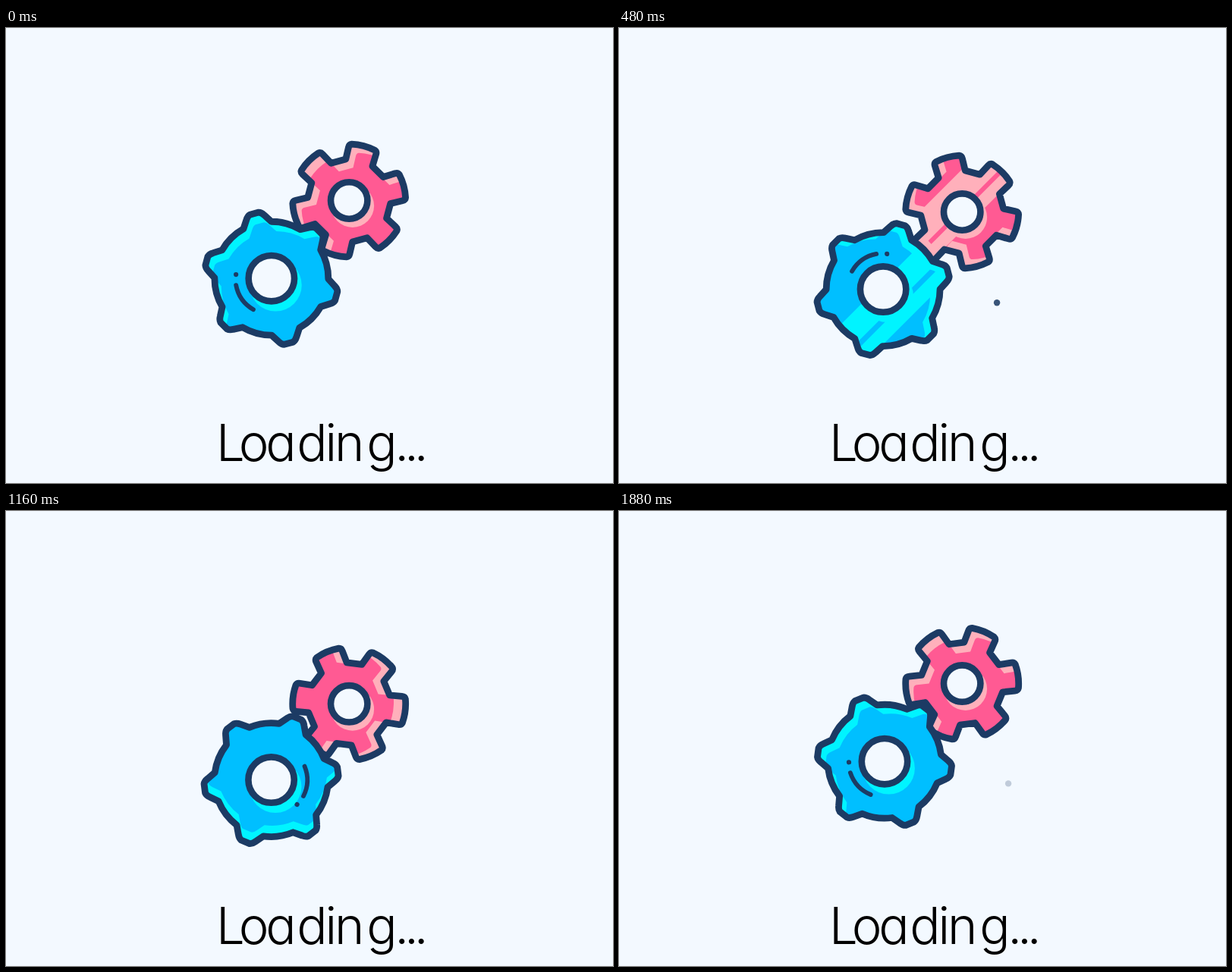
Write an HTML page that moves like this. It is 800 px wide and 600 px high and loops after 1920 ms.

```html
<!DOCTYPE html>
<html lang="en">
<head>
<meta charset="utf-8">
<title>Loading</title>
<style>
  html, body { margin: 0; width: 100%; height: 100%; overflow: hidden; background: #f3f9ff; }
  svg { display: block; width: 100vw; height: 100vh; }
  text {
    font: 300 67px Inter, "Open Sans", sans-serif;
    font-feature-settings: "cv11";
    letter-spacing: -3.2px;
  }
</style>
</head>
<body>
<svg id="stage" viewBox="0 0 800 600">
  <text x="277" y="570.5" dx="0 -5 -1 4 0 0 6 0 -3 -3">Loading...</text>
</svg>
<script>
const LOOP = 1920, NAVY = '#1c3b64', PAPER = '#f3f9ff', RAD = Math.PI / 180;
const stage = document.getElementById('stage');

function add(parent, tag, attrs = {}) {
  const el = document.createElementNS('http://www.w3.org/2000/svg', tag);
  for (const key in attrs) el.setAttribute(key, attrs[key]);
  return parent.appendChild(el);
}

const polar = (r, deg) => [r * Math.cos(deg * RAD), r * Math.sin(deg * RAD)];
const fmt = ([x, y]) => x.toFixed(2) + ' ' + y.toFixed(2);

// Point given along and across an axis that leaves the centre at deg.
function onAxis(deg, along, across) {
  const [c, s] = polar(1, deg);
  return fmt([along * c - across * s, along * s + across * c]);
}

// Round body with six tapered teeth.
function cogPath() {
  let d = '';
  for (let i = 0; i < 6; i++) {
    const a = 15 + 60 * i, p = (r, w) => onAxis(a, r, w);
    d += `${i ? 'A75 75 0 0 1 ' : 'M'}${p(72.5, -19)}L${p(83, -12.2)}Q${p(87.5, -9.5)} ${p(88.5, -6)}`
       + `L${p(88.5, 6)}Q${p(87.5, 9.5)} ${p(83, 12.2)}L${p(72.5, 19)}`;
  }
  return d + 'A75 75 0 0 1 ' + onAxis(15, 72.5, -19) + 'Z';
}

// Wide arc-tipped teeth separated by six notches.
function notchPath() {
  let d = '';
  for (let i = 0; i < 6; i++) {
    const a = 15 + 60 * i, p = (r, w) => onAxis(a, r, w);
    d += `${i ? 'A74.5 74.5 0 0 1 ' : 'M'}${p(70.9, -22.8)}Q${p(71.5, -19.5)} ${p(68, -17.7)}`
       + `L${p(53.7, -10)}L${p(53.7, 10)}L${p(68, 17.7)}Q${p(71.5, 19.5)} ${p(70.9, 22.8)}`;
  }
  return d + 'A74.5 74.5 0 0 1 ' + onAxis(15, 70.9, -22.8) + 'Z';
}

function makeGear({ id, d, base, light, lightFrom, depth, hub, shade, bands }) {
  const root = add(stage, 'g'), turning = [];
  const turn = (parent, tag, attrs) => {
    const el = add(parent, tag, attrs);
    turning.push(el);
    return el;
  };
  turn(add(root, 'clipPath', { id }), 'path', { d });

  const body = add(root, 'g', { 'clip-path': `url(#${id})` });
  add(body, 'circle', { r: 100, fill: light });
  const [fx, fy] = polar(depth, lightFrom + 180);
  add(turn(body, 'g'), 'path', { d, fill: base, transform: `translate(${fx} ${fy}) scale(.97)` });

  const shine = add(add(body, 'g', { transform: 'rotate(45)' }), 'g');
  for (const [from, to] of bands)
    add(shine, 'rect', { x: from, y: -110, width: to - from, height: 220, fill: light });

  add(body, 'circle', { cx: shade[0], cy: shade[1], r: hub + 4.2, fill: light });
  turn(root, 'path', { d, fill: 'none', stroke: NAVY, 'stroke-width': 8.8, 'stroke-linejoin': 'round' });
  add(root, 'circle', { r: hub, fill: PAPER, stroke: NAVY, 'stroke-width': 8.6 });

  return {
    turn,
    root,
    pose(x, y, deg, sweep) {
      root.setAttribute('transform', `translate(${x} ${y})`);
      for (const el of turning) el.setAttribute('transform', `rotate(${deg})`);
      shine.setAttribute('transform', `translate(${sweep} 0)`);
    }
  };
}

const spark = add(stage, 'circle', { r: 4.2, fill: NAVY });

const pink = makeGear({
  id: 'pinkClip', d: notchPath(), base: '#ff5a93', light: '#ffb0bb', lightFrom: 225, depth: 13.5,
  hub: 24.2, shade: [4.5, 7], bands: [[-40, -5], [1, 17]]
});
const blue = makeGear({
  id: 'blueClip', d: cogPath(), base: '#00bfff', light: '#00f4ff', lightFrom: 238, depth: 12.5,
  hub: 30.2, shade: [5.5, 9], bands: [[-7, 25], [32, 51]]
});

// Glint that turns with the blue gear.
const glint = blue.turn(blue.root, 'g');
add(glint, 'path', {
  d: `M${fmt(polar(47.5, 169))}A47.5 47.5 0 0 0 ${fmt(polar(47.5, 120))}`,
  fill: 'none', stroke: NAVY, 'stroke-width': 5.8, 'stroke-linecap': 'round'
});
const [gx, gy] = polar(47, 186);
add(glint, 'circle', { cx: gx, cy: gy, r: 3.1, fill: NAVY });

// Each spark drifts up while it fades in and out.
const sparks = [
  { start: 100, peak: 540, end: 800, at: 320, x: 491, y: 397, vx: .044, vy: -.216 },
  { start: 1300, peak: 1760, end: 1919, at: 1480, x: 475, y: 405.5, vx: .095, vy: -.115 }
];

function drawSpark(t) {
  const s = sparks.find(k => t >= k.start && t < k.end);
  if (!s) return spark.setAttribute('opacity', 0);
  const fade = t < s.peak ? (t - s.start) / (s.peak - s.start) : (s.end - t) / (s.end - s.peak);
  spark.setAttribute('cx', s.x + s.vx * (t - s.at));
  spark.setAttribute('cy', s.y + s.vy * (t - s.at));
  spark.setAttribute('opacity', fade);
}

function draw(t) {
  const deg = 360 * t / LOOP;
  const drop = 15 * (1 - Math.cos(deg * RAD));
  const sweep = (t - 480) * .285;
  const [wx, wy] = polar(1.3, deg + 65);
  pink.pose(452.2, 227.5 + drop, -deg, sweep);
  blue.pose(349.3 + wx, 329 + drop + wy, deg, sweep);
  drawSpark(t);
}

const begin = performance.now();
function tick(now) {
  draw(Math.max(0, now - begin) % LOOP);
  requestAnimationFrame(tick);
}
draw(0);
requestAnimationFrame(tick);
</script>
</body>
</html>
```
